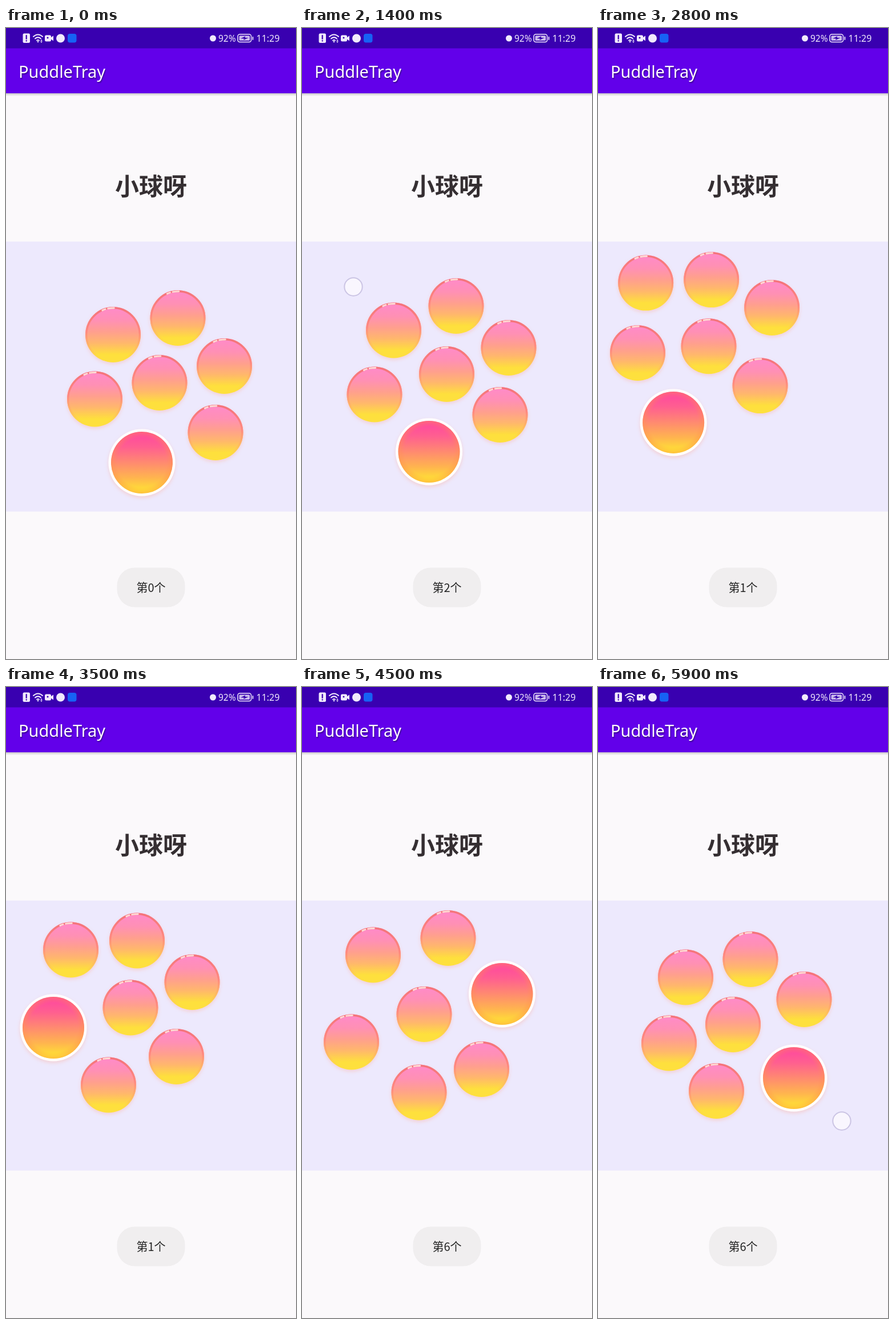
An HTML page that plays this animation: 508 px wide and 1102 px high, repeating every 6000 ms.

```html
<!DOCTYPE html>
<html lang="zh-CN">
<head>
<meta charset="utf-8">
<title>Bubbles</title>
<style>
  html, body { margin: 0; width: 100%; height: 100%; overflow: hidden; background: #fbf9fb; }
  svg { display: block; }
  text { font-family: "Noto Sans", sans-serif; }
  .cjk { font-family: "Noto Sans CJK SC", "Noto Sans CJK", sans-serif; text-anchor: middle; }
  .bar { fill: none; stroke: #f1eafc; stroke-width: 2; stroke-linecap: round; }
</style>
</head>
<body>
<svg width="508" height="1102" viewBox="0 0 508 1102">
  <defs>
    <linearGradient id="soft" x2="0" y2="1">
      <stop offset=".05" stop-color="#ff8bc6"/>
      <stop offset=".25" stop-color="#ff90b4"/>
      <stop offset=".45" stop-color="#ff9f8e"/>
      <stop offset=".65" stop-color="#ffb76c"/>
      <stop offset=".86" stop-color="#fee03c"/>
      <stop offset="1" stop-color="#fee03c"/>
    </linearGradient>
    <linearGradient id="rim" x2="0" y2="1">
      <stop offset="0" stop-color="#f4747a"/>
      <stop offset=".45" stop-color="#ff8a80"/>
      <stop offset=".8" stop-color="#ffc25a" stop-opacity=".7"/>
      <stop offset="1" stop-color="#fee03c" stop-opacity="0"/>
    </linearGradient>
    <linearGradient id="vivid" x2="0" y2="1">
      <stop offset=".06" stop-color="#ff4b9d"/>
      <stop offset=".25" stop-color="#ff5f90"/>
      <stop offset=".5" stop-color="#ff8a70"/>
      <stop offset=".75" stop-color="#ffb54e"/>
      <stop offset=".95" stop-color="#ffe135"/>
    </linearGradient>
    <radialGradient id="edge">
      <stop offset=".8" stop-color="#ff9048" stop-opacity="0"/>
      <stop offset="1" stop-color="#ff9048" stop-opacity=".4"/>
    </radialGradient>
    <linearGradient id="fade" x2="0" y2="1">
      <stop offset="0" stop-color="#000" stop-opacity=".2"/>
      <stop offset="1" stop-color="#000" stop-opacity="0"/>
    </linearGradient>
    <filter id="glow" x="-20%" y="-20%" width="140%" height="145%">
      <feDropShadow dx="0" dy="3" stdDeviation="3" flood-color="#ffa48c" flood-opacity=".35"/>
    </filter>
    <g id="plain">
      <circle r="48.5" fill="url(#soft)" filter="url(#glow)"/>
      <circle r="46.7" fill="none" stroke="url(#rim)" stroke-width="3.4"/>
      <path d="M-18.6-42.4Q-16.3-43.6-13.6-44.4M-8.8-45.6Q-3.5-46.6 1.8-46.5" fill="none"
            stroke="#ffd9d4" stroke-width="3" stroke-linecap="round"/>
    </g>
    <g id="picked">
      <circle r="58.5" fill="#fff" filter="url(#glow)"/>
      <circle r="54" fill="url(#vivid)"/>
      <circle r="54" fill="url(#edge)"/>
    </g>
  </defs>

  <rect width="508" height="1102" fill="#fbf9fb"/>
  <rect y="114" width="508" height="5" fill="url(#fade)"/>
  <rect y="35" width="508" height="79" fill="#6200ea"/>
  <rect width="508" height="35.5" fill="#3900b0"/>

  <!-- status bar -->
  <g fill="#f1eafc">
    <rect x="29.5" y="9.5" width="12.5" height="16.5" rx="2.5"/>
    <path d="M35.7 13v6M35.7 22v.6" stroke="#3900b0" stroke-width="2.2" stroke-linecap="round"/>
    <path class="bar" d="M48 15q8-7 16 0M51 18.5q5-4.200 10 0M54 21.700q2-1.500 4 0"/>
    <circle cx="56" cy="24" r="1.300"/>
    <path d="M62 20l1.800 2.500h-3.600zM62 26l1.800-2.500h-3.600z"/>
    <rect x="68" y="12.500" width="11" height="11" rx="2.500"/>
    <path d="M78 17l5-3.500v9l-5-3.500z"/>
    <circle cx="73" cy="17" r="1.500" fill="#3900b0"/>
    <circle cx="95.500" cy="18" r="7.500"/>
    <rect x="108" y="10" width="15.500" height="15.500" rx="4" fill="#1762f5"/>
    <circle cx="362.500" cy="18" r="5.500"/>
    <text x="372" y="24" font-size="15.500">92%</text>
    <rect x="406" y="11" width="23.500" height="13.500" rx="3.500" fill="none" stroke="#f1eafc" stroke-width="1.500"/>
    <rect x="408.500" y="13.500" width="18.500" height="8.500" rx="1.500" opacity=".8"/>
    <path d="M411 18.500l8-4v2.500h5.500l-8 4v-2.500z" fill="#3900b0"/>
    <rect x="431.500" y="15" width="1.800" height="6" rx=".9"/>
    <text x="438.500" y="24" font-size="16">11:29</text>
  </g>

  <text x="22" y="87" font-size="29" font-weight="500" fill="#fff"
        style="text-shadow: 1px 2px 2px #0006">PuddleTray</text>
  <text class="cjk" x="254" y="292" font-size="42" font-weight="700" fill="#352f32">小球呀</text>
  <rect y="373" width="508" height="471.500" fill="#ede9fd"/>
  <g id="field"></g>
  <circle id="touch" r="15.700" fill="#f9f6fe" stroke="#cbc4e4" stroke-width="2"/>
  <rect x="194.500" y="942.500" width="119" height="69" rx="31" fill="#f0eeef"/>
  <text id="toast" class="cjk" x="254" y="985" font-size="20" fill="#222"></text>
</svg>
<script>
const LOOP = 6000;
const $ = id => document.getElementById(id);
const clamp = v => Math.max(0, Math.min(1, v));

// Bubble order: upper left, top, right, centre, left, bottom, lower right
const corner = [69, 439, 186, 437.5, 296.5, 477, 179.5, 554.5, 62.5, 556.5, 110.5, 687, 278.5, 616.5];
const poses = [
  [0, [187.5, 535.5, 301, 506.5, 382.5, 590.5, 269, 619.5, 155.5, 648, 238, 759, 367, 706.5]],
  [700, [158.5, 518.5, 272.5, 492.5, 363.5, 566, 254.5, 609, 120.5, 652, 238.5, 726.5, 346.5, 682]],
  [1400, [160.5, 528, 270, 485.5, 362, 558.5, 253.5, 604.5, 127, 640, 222.5, 740, 347, 675.5]],
  [2050, corner],
  [2300, corner],
  [3500, [113.5, 459, 229.5, 443, 326, 515.5, 218, 560, 83, 595, 179.5, 695, 298.5, 645.5]],
  [4500, [124.5, 468, 256, 438.5, 350.5, 536, 214, 571.5, 86.5, 620, 205, 708, 314.5, 667.5]],
  [5900, [153.5, 507, 267, 475.5, 361, 545.5, 236.5, 589.5, 124.5, 622, 207.5, 705.5, 343, 683]]
];
const picks = [[-500, 5], [350, 4], [1000, 5], [3000, 4], [4000, 2], [5200, 6], [LOOP + 500]];
const toasts = [[0, 0], [450, 2], [2800, 1], [4400, 6]];
const touches = [[1300, 2000, 90, 452], [5750, LOOP, 427, 758]];

const bubbles = poses[0][1].slice(0, 7).map(() => {
  const g = document.createElementNS("http://www.w3.org/2000/svg", "g");
  g.innerHTML = '<use href="#plain"/><use href="#picked"/>';
  $("field").append(g);
  return g;
});

function slope(k, i) {
  const rate = j => (poses[j + 1][1][i] - poses[j][1][i]) / (poses[j + 1][0] - poses[j][0]);
  if (k === 0) return rate(0);
  if (k === poses.length - 1) return rate(k - 1);
  const a = rate(k - 1), b = rate(k);
  return a * b > 0 ? 2 * a * b / (a + b) : 0;
}

// Monotone cubic curve through the poses
function place(t, i) {
  let k = 0;
  while (k < poses.length - 2 && t >= poses[k + 1][0]) k++;
  const [t0, p] = poses[k], [t1, q] = poses[k + 1];
  const d = t1 - t0, u = clamp((t - t0) / d), v = 1 - u;
  return v * v * (1 + 2 * u) * p[i] + u * u * (3 - 2 * u) * q[i]
    + d * u * v * (v * slope(k, i) - u * slope(k + 1, i));
}

function picked(t, n) {
  const ramp = start => clamp((t - start) / 180);
  return picks.reduce((sum, [start, who], k) =>
    who === n ? sum + ramp(start) - ramp(picks[k + 1][0]) : sum, 0);
}

function draw(t) {
  bubbles.forEach((g, n) => {
    const s = picked(t, n), r = 48.5 + 10 * s;
    g.setAttribute("transform", `translate(${place(t, 2 * n)} ${place(t, 2 * n + 1)})`);
    const [plain, strong] = g.children;
    plain.setAttribute("transform", `scale(${r / 48.5})`);
    strong.setAttribute("transform", `scale(${r / 58.5})`);
    plain.style.display = s < 1 ? "" : "none";
    strong.style.display = s > 0 ? "" : "none";
    strong.style.opacity = s;
  });
  $("toast").textContent = `第${toasts.filter(([start]) => t >= start).pop()[1]}个`;
  const spot = touches.find(([from, to]) => t >= from && t < to);
  $("touch").style.display = spot ? "" : "none";
  if (spot) $("touch").setAttribute("transform", `translate(${spot[2]} ${spot[3]})`);
}

let begin;
function tick(now) {
  begin ??= now;
  draw((now - begin) % LOOP);
  requestAnimationFrame(tick);
}
draw(0);
requestAnimationFrame(tick);
</script>
</body>
</html>
```
